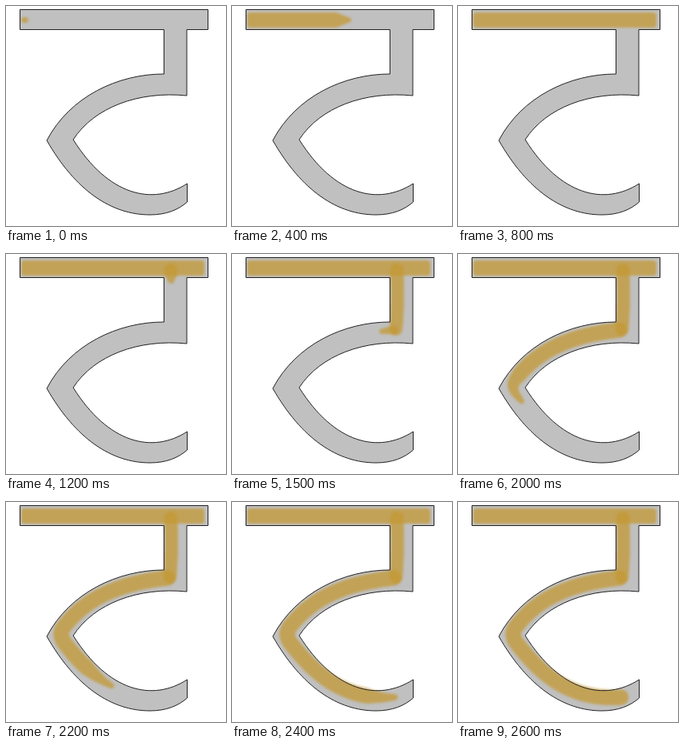
Recreate the animation shown at these times as an HTML page with a canvas. Size 275x275 px, loop 2.7 s.

```html
<!DOCTYPE html>
<html>
<head>
<meta charset="utf-8">
<style>
  html, body { margin: 0; width: 100%; height: 100%; overflow: hidden; background: #fff; }
  canvas { display: block; }
</style>
</head>
<body>
<canvas id="stage" width="275" height="275"></canvas>
<script>
const LOOP = 2700, STEP = 100, SIZE = 275;
const ctx = document.getElementById('stage').getContext('2d');
const layer = new OffscreenCanvas(SIZE, SIZE);
const paint = layer.getContext('2d');
paint.fillStyle = 'rgb(195, 153, 52)';

const letter = new Path2D(`M197.5 29.5H17.5V4.5H252.5V29.5H226V112
  C165 106 110 127 84 167C128 237 183 250 226.5 222V245
  C215 255 200 261 180 261C132 261 87 231 51 168
  C80 113 140 85 197.5 85Z`);

// Points one pixel apart along an SVG path
function sample(d) {
  const path = document.createElementNS('http://www.w3.org/2000/svg', 'path');
  path.setAttribute('d', d);
  return Array.from({ length: Math.floor(path.getTotalLength()) + 1 },
    (_, s) => path.getPointAtLength(s));
}

// keys: [time, distance of the brush tip]; slope: how fast the brush widens behind its tip
const strokes = [
  {
    points: sample('M23 17.5H244'),
    radius: 9.5, slope: .4, halfWidth: 4,
    keys: [[0, 1], [400, 122], [700, 245]]
  },
  {
    points: sample('M206 20Q208 60 205 94'),
    radius: 8, slope: .5,
    keys: [[1100, 0], [1200, 14], [1500, 95]]
  },
  {
    points: sample(`M202 95C155 100 104 113 71 158
      Q66 166 73 176C104 216 140 248 204 244`),
    radius: 9.5, slope: .16,
    keys: [[1450, 0], [1700, 75], [2200, 250], [2550, 385]]
  }
];

function tipAt(keys, t) {
  const i = keys.findIndex(([time]) => time >= t);
  if (i < 0) return keys.at(-1)[1];
  if (i === 0) return keys[0][1];
  const [t0, s0] = keys[i - 1], [t1, s1] = keys[i];
  return s0 + (s1 - s0) * (t - t0) / (t1 - t0);
}

function drawStroke({ points, radius, slope, halfWidth, keys }, t) {
  if (t < keys[0][0]) return;
  const tip = tipAt(keys, t);
  paint.clearRect(0, 0, SIZE, SIZE);
  points.forEach(({ x, y }, s) => {
    if (s > tip) return;
    const r = Math.min(radius, 3 + (tip - s) * slope);
    const w = halfWidth ?? r;
    paint.beginPath();
    paint.roundRect(x - w, y - r, 2 * w, 2 * r, Math.min(w, r));
    paint.fill();
  });
  ctx.drawImage(layer, 0, 0);
}

function draw(t) {
  ctx.fillStyle = '#fff';
  ctx.fillRect(0, 0, SIZE, SIZE);
  ctx.fillStyle = '#c0c0c0';
  ctx.fill(letter);

  ctx.save();
  ctx.filter = 'blur(1.5px)';
  ctx.globalAlpha = .75;
  strokes.forEach(stroke => drawStroke(stroke, t));
  ctx.restore();

  ctx.strokeStyle = '#222';
  ctx.stroke(letter);
}

function frame() {
  draw(Math.floor(performance.now() % LOOP / STEP) * STEP);
  requestAnimationFrame(frame);
}
frame();
</script>
</body>
</html>
```
